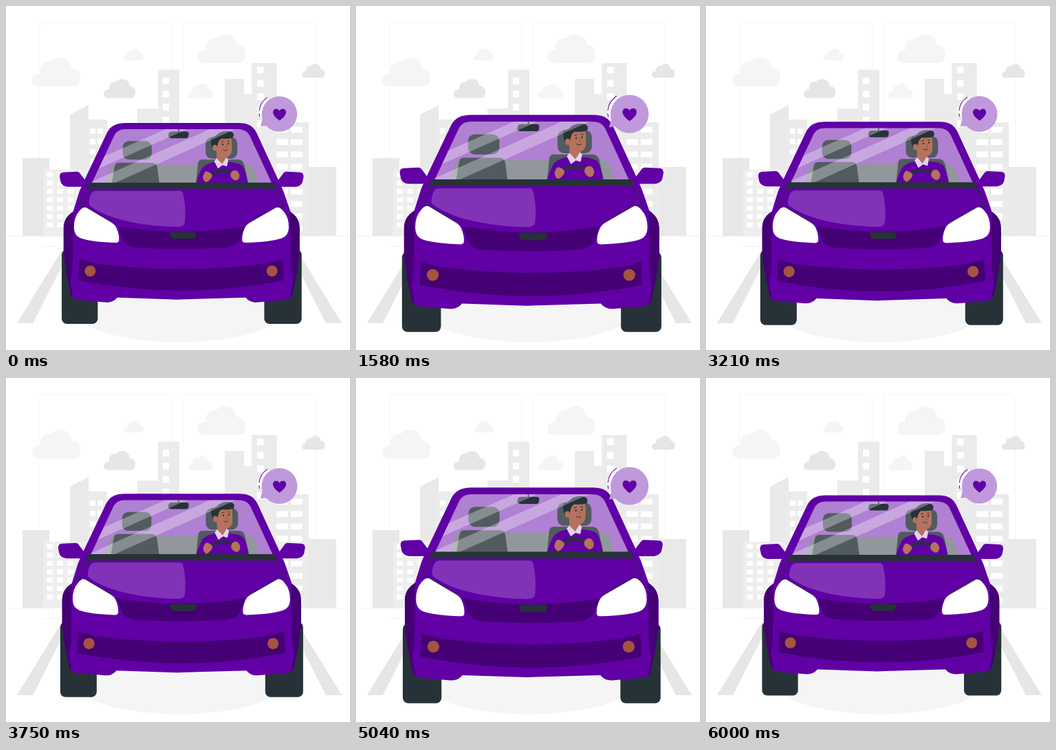
These frames come from a looping animation (500x500 px, 6040 ms). An HTML page:

```html
<!DOCTYPE html>
<html lang="en">
<head>
<meta charset="utf-8">
<title>Driver</title>
<style>
  html, body { margin: 0; width: 100%; height: 100%; overflow: hidden; background: #fff; }
  svg { display: block; width: 100vw; height: 100vh; }
  .main { fill: #6000a5; }
  .shade { fill: #440074; }
  .ink { fill: #263238; }
  .seat { fill: #515b60; }
  .skin { fill: #b5725d; }
  .line { fill: none; stroke-linecap: round; stroke-linejoin: round; }
</style>
</head>
<body>
<svg viewBox="0 0 500 500">
  <defs>
    <path id="cloud" d="M9 42Q0 41 0 33Q1 23 12 23Q11 6 27 6Q33 0 42 0Q56 2 57 15Q70 17 70 29Q69 42 60 42Z"/>
    <clipPath id="glass">
      <path d="M158 188C163 180 169 179.500 177 179.500H335C345 179.500 350 182 354 189L386 258H125Z"/>
    </clipPath>
    <g id="side">
      <path class="shade" d="M98 299C87 306 84.300 314 84.300 324V360L88.500 390L95 421L98 424L94 400L97 384Z"/>
      <path class="main" d="M84 242L103 241Q107 241 109 245L119 258L112 263H90Q82 262 80 256L78.500 248Q78.500 242 84 242Z"/>
      <path class="line" stroke="#263238" d="M120 265C116 276 108 282 107.500 292"/>
    </g>
    <g id="lamp">
      <path class="line" stroke="#263238" d="M108 292L117 292.500L155 315"/>
      <path fill="#fff" d="M117 293Q112 291.500 107 298Q99 307 99.300 322Q99.500 334 109 337.500Q125 343 160 344Q164.500 344 164.500 340Q165 332 161 323Q159 318 154 315Z"/>
    </g>
  </defs>

  <g id="city">
    <g fill="#fff" stroke="#f6f6f6">
      <rect x="48.500" y="23.500" width="193" height="311" rx="5"/>
      <rect x="257.500" y="23.500" width="192" height="311" rx="5"/>
    </g>
    <g id="sky"></g>
    <g id="towers"></g>
    <path class="line" stroke="#efefef" stroke-width=".8" d="M0 334.500H500M52 349.500H85"/>
    <path fill="#e6e6e6" d="M16 461H39L92 357H80ZM488 461H465L412 357H424Z"/>
    <ellipse cx="252" cy="444" rx="150" ry="44.500" fill="#f5f5f5"/>
  </g>

  <g id="car">
    <g class="ink">
      <rect x="81.500" y="354" width="52.200" height="107.500" rx="7.500"/>
      <rect x="375" y="354" width="54.200" height="107.500" rx="7.500"/>
    </g>
    <path class="main" d="M175 170.500H337C352 170.500 359 175 364 185L394 250L403 270L413 299C423 306 426.300 314 426.300 324V360L422 390L415 422Q411 426 405 427L364 430.500Q354 431 348 423.500L261 426L249 426.500L162 423.500Q156 431 146 430.500L105 427Q99 426 95 421L88.500 390L84.300 360V324C84.300 314 87 306 98 299L107 270L116 250L147 185C152 175 160 170.500 175 170.500Z"/>

    <g clip-path="url(#glass)">
      <path fill="#b080d2" d="M110 170H400V260H110Z"/>
      <path fill="#91979b" d="M146 258L152 238Q154 231 161 231H349Q357 231 360 237L367 258Z"/>
      <g class="seat">
        <rect x="170" y="196.500" width="42" height="27" rx="9"/>
        <path d="M164 228H212Q219 228 220 235L223 258H154L158 234Q159 228 164 228Z"/>
        <rect x="290" y="191" width="46" height="31" rx="9"/>
        <path d="M284 223.500H338Q344 224 346 231L352 258H276L279 229Q280 224 284 223.500Z"/>
      </g>
      <path class="ink" d="M250 178H252V183H262Q266 183 265.500 187L265 190Q264.500 192.500 262 192.500H240Q236 192 236 188.500L237 185Q238 183 241 183H250Z"/>

      <g id="driver">
        <path class="main" d="M303 227Q289 230 285 236Q280 244 276 258H351Q349 240 343 232Q337 228 323 227Z"/>
        <path class="skin" d="M306 211H321V224L314 231L306 225Z"/>
        <path fill="#e4d3f0" d="M302.500 226L306 221.500L314 230L320 220.500L323 223.500L321 233.500L314.500 231.500L308 236.500Z"/>
        <path class="skin" d="M305 196Q315 189 327 190Q329 203 327.500 213Q324 222 315 219.500Q308 217 305 211Z"/>
        <path class="ink" d="M300 207Q296 196 298.500 191Q304 191 309 185.500Q318 180 328 183.500Q333 187 329 192Q322 194 313 193Q309 195 308 200L306 207Z"/>
        <ellipse class="skin" cx="303.500" cy="206.500" rx="3.200" ry="4.300"/>
        <g class="ink">
          <ellipse cx="315" cy="201.500" rx="1" ry="1.400"/>
          <ellipse cx="323" cy="200.500" rx="1" ry="1.400"/>
        </g>
        <path class="line" stroke="#263238" stroke-width=".9" d="M312.500 198L316 197M321.500 196.500L324.500 197M315.500 209.500Q318.500 212 321.500 210"/>
        <path class="line" stroke="#8f5142" stroke-width=".8" d="M319.500 201.500L321 205.500L319 206.500"/>
        <path class="line" stroke="#263238" stroke-width="4" d="M295 252Q297 240 314 240Q331 240 333 250"/>
        <path class="skin" d="M288 243Q290 239.500 293 241Q299 243 299.500 247Q298 253 291 256.500Q286 254 286 248Z"/>
        <path class="skin" d="M327 242Q331 237 335.500 240Q340 244 339 249Q337 255 332 253.500Q326 250 326 246Z"/>
      </g>
      <path fill="#fff" opacity=".3" d="M120 229L233 179H264L116 245ZM122 257L297 179H334L157 258Z"/>
    </g>

    <path class="ink" d="M122 257H388Q392 261 393 266H117Q119 260 122 257Z"/>
    <path fill="#8033b7" d="M130 269H253Q257 269 258 276Q262 294 260 314Q260 321 249 321C205 320 150 312 122 290Q120 286 122 279Q124 270 130 269Z"/>
    <path class="shade" d="M163 320Q208 328 255 328Q302 328 346 320L340 338Q336 348 321 351Q255 355 188 351Q172 348 169 338Z"/>
    <path class="ink" d="M238 328.500H277L275 336Q274 338.500 271 338.500H244Q241 338.500 240 336Z"/>
    <path class="shade" d="M107 367.500Q120 372 136 374.500Q255 390 374 374.500Q391 372 402 367.500L403.500 398.500Q255 428 105.500 398.500Z"/>
    <use href="#side"/>
    <use href="#side" transform="matrix(-1 0 0 1 510.500 0)"/>
    <use href="#lamp"/>
    <use href="#lamp" transform="matrix(-1.035 0 0 1 513.300 0)"/>
    <g fill="#a5543f">
      <circle cx="122.700" cy="385" r="8"/>
      <circle cx="386.200" cy="385" r="8"/>
    </g>
  </g>

  <g id="bubble">
    <path fill="#fff" d="M368.500 160Q367 140 381 132.500L397 157Z"/>
    <path class="line" stroke="#6000a5" d="M368.300 152Q369.500 140 380 133M368.300 156.500L368.800 160.500"/>
    <circle cx="397.500" cy="157" r="25.600" fill="#bf99db"/>
    <path fill="#bf99db" d="M373 164L370 175L384 173Z"/>
    <path class="main" d="M397.500 166.500Q388 160 388 154.500Q388.500 149.500 392.500 149.500Q396 149.500 397.500 152.500Q399 149.500 402.500 149.500Q406.500 149.500 407 154.500Q407 160 397.500 166.500Z"/>
  </g>
</svg>

<script>
const byId = id => document.getElementById(id);

// x, y, scale, fill
const clouds = [
  [38, 75, 1, '#f5f5f5'], [171, 62, .41, '#f5f5f5'], [142, 106, .66, '#e6e6e6'],
  [278, 41, 1, '#f5f5f5'], [265, 113, .51, '#f5f5f5'], [430, 84, .48, '#e6e6e6']
];
byId('sky').innerHTML = clouds.map(([x, y, s, fill]) =>
  `<use href="#cloud" fill="${fill}" transform="translate(${x} ${y}) scale(${s})"/>`).join('');

const block = (x, y, w, fill = '#ebebeb') =>
  `<rect x="${x}" y="${y}" width="${w}" height="${334 - y}" fill="${fill}"/>`;

function panes(xs, top, step, rows, w, h) {
  let out = '';
  for (let r = 0; r < rows; r++)
    for (const x of xs)
      out += `<rect x="${x}" y="${top + r * step}" width="${w}" height="${h}" fill="#fff"/>`;
  return out;
}

byId('towers').innerHTML = [
  '<path fill="#e9e9e9" d="M93 158L120 144V334H93Z"/>',
  block(116, 165, 31), panes([122, 133], 178, 15, 5, 8, 8),
  block(191, 149, 31), block(221, 92.5, 31), panes([228], 104, 19, 4, 9, 10),
  block(318, 106, 28), block(345, 128, 14),
  block(357.3, 83, 36.5), panes([365], 88, 19.5, 5, 9.5, 10),
  block(385, 169, 55), panes([393, 414], 175.5, 18, 9, 17, 8.5),
  block(440, 234, 40, '#e9e9e9'),
  block(24, 221, 39, '#e8e8e8'),
  block(54, 238, 62, '#eee'), panes([59.5, 74.5, 89.5], 241.5, 12.2, 7, 8.5, 7)
].join('');

const LOOP = 6040, STEPS = 145;
// time in ms, scale
const zoom = [[0, 1.003], [1165, 1.1], [3565, 1], [4765, 1.1], [6000, 1], [LOOP, 1.003]];

function scaleAt(t) {
  const i = zoom.findIndex(([end]) => t < end);
  const [t0, a] = zoom[i - 1], [t1, b] = zoom[i];
  return a + (b - a) * (t - t0) / (t1 - t0);
}

const scaled = (id, s, x, y) =>
  byId(id).setAttribute('transform', `translate(${x} ${y}) scale(${s}) translate(${-x} ${-y})`);

const start = performance.now();
function draw() {
  const t = (performance.now() - start) % LOOP;
  const held = Math.floor(t / LOOP * STEPS) * LOOP / STEPS;
  const s = scaleAt(held);
  scaled('car', s, 255.3, 315.7);
  scaled('bubble', s, 395.5, 157);
  requestAnimationFrame(draw);
}
draw();
</script>
</body>
</html>
```
